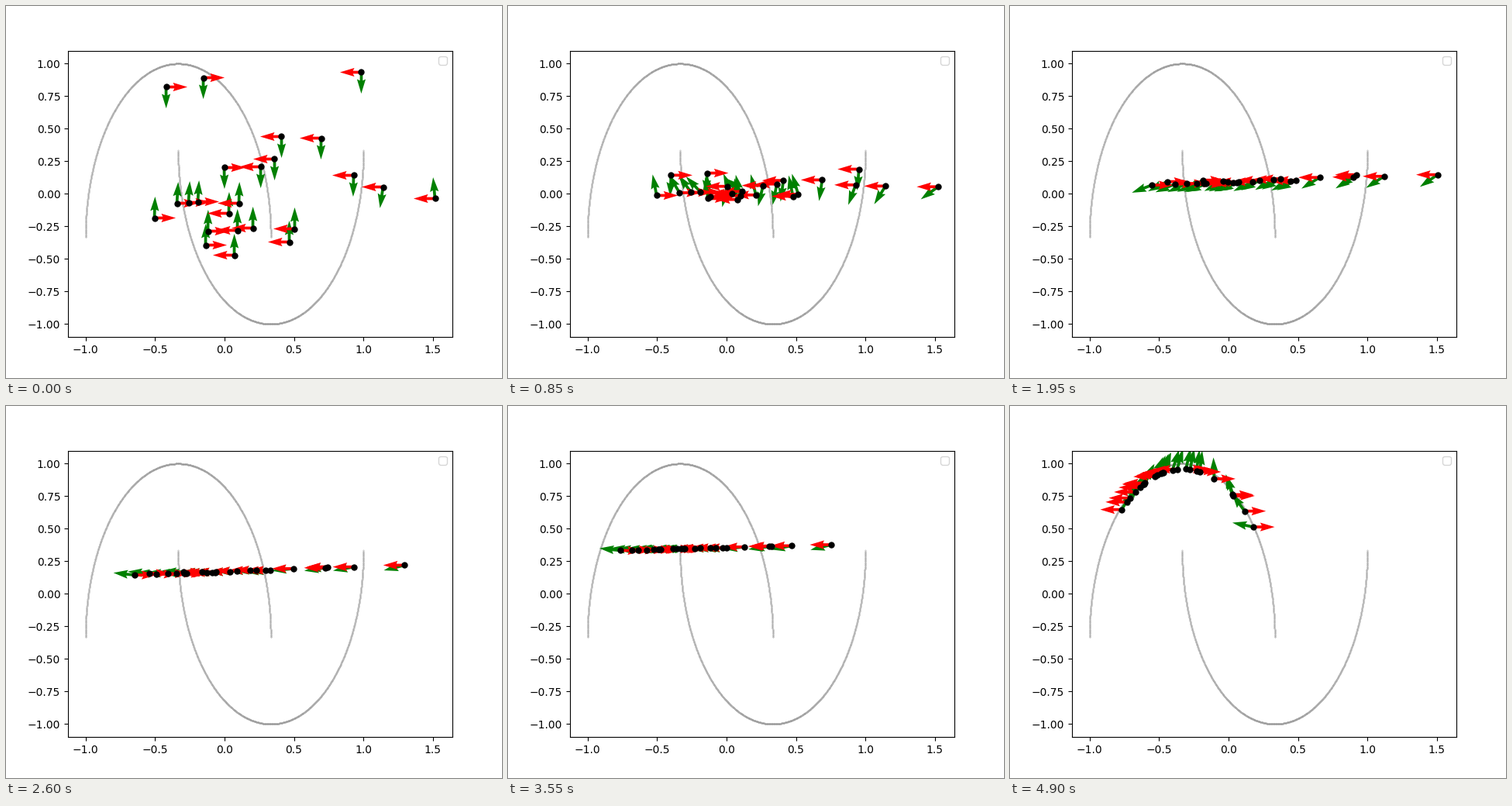
Recreate the animation shown at these times as a matplotlib script. Size 640 px wide and 480 px high, loop 4950 ms.

```python
import numpy as np
import matplotlib.pyplot as plt
from matplotlib.animation import FuncAnimation

FRAMES, STEP = 99, 50
HOLDS = (44, 72)        # steps that repeat the pose before them
HEIGHT = 480
X_SPAN = 2.5145
MID = 242.4             # pixel row of y = 0

# Where the particles start, in pixels from the top left
START = np.array([
    (206, 104), (254, 92), (458, 85), (355, 168), (406, 170), (346, 197),
    (281, 208), (328, 207), (448, 218), (486, 233), (553, 248), (300, 254),
    (287, 267), (220, 254), (235, 253), (247, 252), (191, 273), (260, 290),
    (257, 308), (294, 321), (298, 289), (318, 286), (365, 304), (372, 287)])
X0, Y0 = START.T
OFF = Y0 - MID
SHEAR = -0.0003 * OFF * (X0 - 290)    # sideways slip while falling onto the line
S = (X0 - SHEAR - 190) / 363          # place along the line, 0 left to 1 right


def ramp(t, start, end):
    u = np.clip((t - start) / (end - start), 0, 1)
    return u * u * (3 - 2 * u)


def unit(u, v):
    n = np.hypot(u, v) + 1e-9
    return u / n, v / n


def positions(t):
    k = np.exp(-t / (404 + 0.056 * t))           # what is left of the start offset
    arch = np.clip((t - 3850) / 1050, 0, 1)**2.5

    left = 190 - 46.5 * ramp(t, 1300, 3800)
    right = 553 - 241 * ramp(t, 1750, 5050)
    along = S + arch * (1.4 * S - 0.35) * S * (1 - S)
    x = left + (right - left) * along

    lift = 2.5 * (1 - k) + 54 * (t / 3550)**2.8 + 26 * arch**2
    tilt = 13 * max(np.sin(np.pi * t / 4400), 0) * S
    drop = 218 * (1 - np.sqrt(1 - np.clip((x - 222.2) / 121, -1, 1)**2))
    y = MID - lift - tilt + arch * drop
    return x + SHEAR * k + 8 * k * (1 - k), y + OFF * k


def red_heading(t, x):
    """Towards a drifting centre, tangent to the arch, then outward."""
    side = np.where(x < 284 - 0.0125 * t, 1.0, -1.0)
    if t >= 4700:
        return -side, 0 * side
    slope = np.clip(0.0034 * (232 - x), -0.25, 0.25) * (1 - S**8)
    return unit(side, side * slope * ramp(t, 3850, 4450))


def green_heading(t, y):
    """First onto the line, then left along it, then up and away from the arch."""
    p = t / 1300
    drift = (3 + 2 * S) * p**2 + (2 * S - 1) * max(1 - p, 0)
    line = 241 - 3 * min(p, 1) - 4.5 * S
    u, v = unit(-drift, y - line)

    # Degrees clockwise from up
    level = -84 - 20 * S
    upright = -16 + 30 * S - 90 * S**24
    fan = 32 - 30 * S - 80 * S**3
    angle = level + (upright - level) * ramp(t, 3850, 4400)
    angle = np.radians(angle + (fan - upright) * ramp(t, 4450, 4900))
    w = ramp(t, 1300, 2600)
    return unit((1 - w) * u + w * np.sin(angle), (1 - w) * v + w * np.cos(angle))


fig, ax = plt.subplots(figsize=(6.4, 4.8), dpi=100)
ax.set_xlim(-1 - 0.05 * X_SPAN, -1 + 1.05 * X_SPAN)
ax.set_ylim(-1.1, 1.1)


def to_data(x, y):
    pixels = np.column_stack([x + 0.5, HEIGHT - y - 0.5])
    return ax.transData.inverted().transform(pixels)


a = np.linspace(0, np.pi, 1000)
moon_x, moon_y = 2 / 3 * np.cos(a) - 1 / 3, 4 / 3 * np.sin(a) - 1 / 3
ax.scatter(np.r_[moon_x, -moon_x], np.r_[moon_y, -moon_y],
           s=0.1, c="gray", alpha=0.5, linewidths=1.1)


def arrows(color):
    return ax.quiver(*to_data(X0, Y0).T, np.ones(len(S)), np.zeros(len(S)),
                     color=color, scale=18, width=0.0075)


green = arrows("green")
red = arrows("red")
dots = ax.scatter(*to_data(X0, Y0).T, s=25, c="black")
ax.legend([], [])


def update(i):
    t = STEP * (i - 1 if i in HOLDS else i)
    x, y = positions(t)
    for artist in (green, red, dots):
        artist.set_offsets(to_data(x, y))
    green.set_UVC(*green_heading(t, y))
    red.set_UVC(*red_heading(t, x))
    return green, red, dots


anim = FuncAnimation(fig, update, frames=FRAMES, interval=STEP,
                     repeat=True, repeat_delay=0, blit=False)
plt.show()
```
